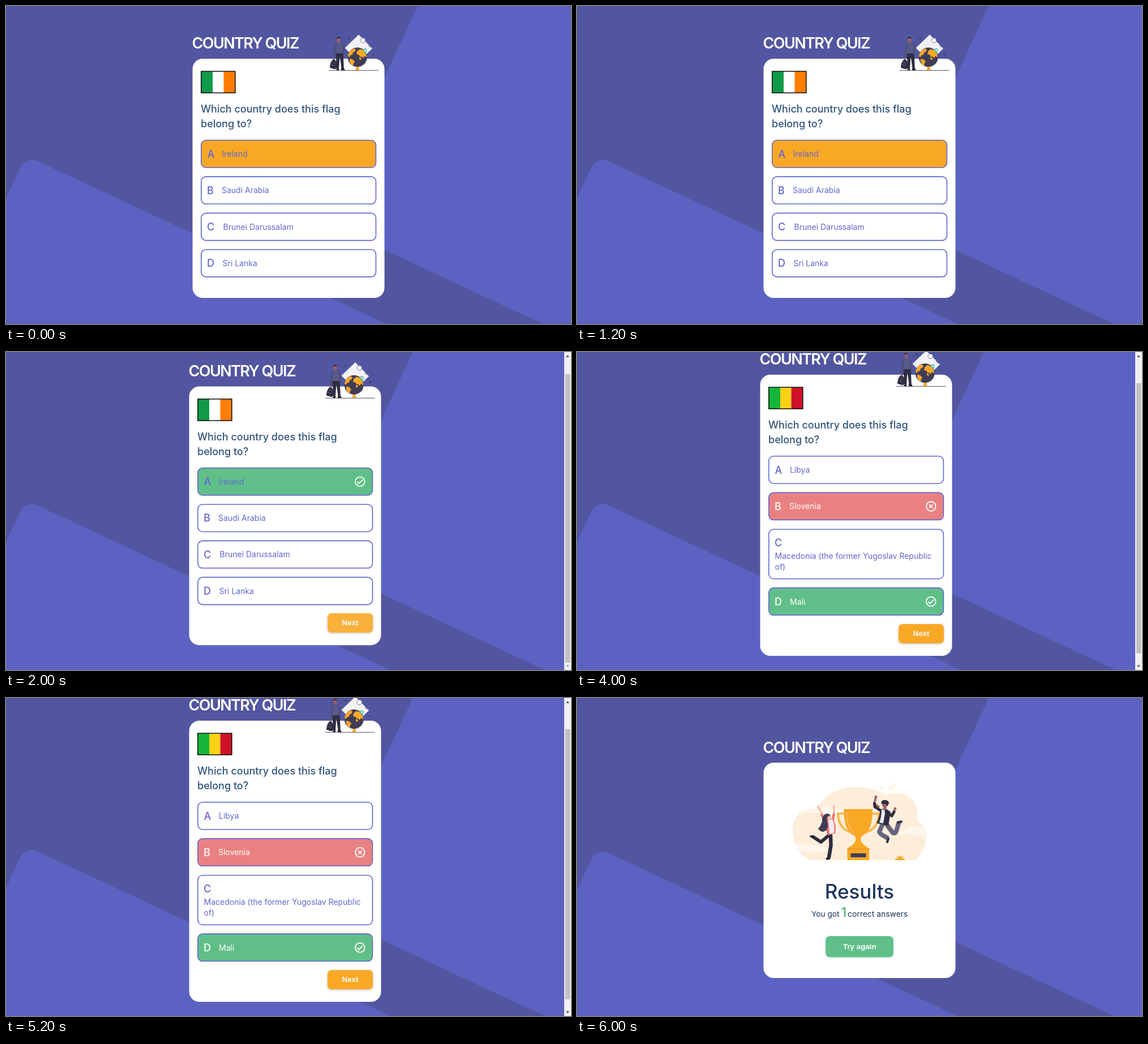
An HTML page for the animation above (8000 ms loop, 998 px wide and 561 px high).

```html
<!DOCTYPE html>
<html lang="en">
<head>
<meta charset="utf-8">
<title>Country quiz</title>
<style>
html, body { margin: 0; width: 100%; height: 100%; overflow: hidden; background: #5256a0; }
svg { display: block; width: 100vw; height: 100vh; font-family: Inter, sans-serif; }

.scene { visibility: hidden; animation: show 8s step-end infinite; }
.s1 { animation-delay: -8s; }
.s2 { animation-delay: -6s; }
.s3 { animation-delay: -4s; }
.s4 { animation-delay: -2s; }
@keyframes show {
  0% { visibility: visible; }
  25%, 100% { visibility: hidden; }
}

.title { font-size: 27px; font-weight: 600; letter-spacing: -1.6px; fill: #fff; }
.ask { font-size: 18px; font-weight: 500; fill: #2f527b; }
.key { font-size: 18px; font-weight: 500; }
.opt { font-size: 14px; }
.rows { fill: #6066d0; }
.rows .on { fill: #fff; }
.box { stroke: #6066d0; stroke-width: 1.6; }
.btn { font: bold 13.33px "Liberation Sans", Arial, sans-serif; fill: #fff; text-anchor: middle; }
.next { filter: drop-shadow(0 1.5px 2px rgba(0, 0, 0, .25)); }
.res { fill: #1d355d; }
.limb { fill: none; stroke-linecap: round; stroke-linejoin: round; }
</style>
</head>
<body>
<svg viewBox="0 0 998 561" preserveAspectRatio="none">
  <defs>
    <g id="bg">
      <rect width="1100" height="700" fill="#5256a0"/>
      <g fill="#5c62c2">
        <rect x="35" y="264" width="1300" height="1000" rx="23" transform="rotate(25 35 264)"/>
        <rect x="552" y="-724" width="1100" height="1100" rx="23" transform="rotate(25 552 376)"/>
      </g>
    </g>

    <rect id="box" class="box" x="344.8" y="236.8" width="308.6" height="48.2" rx="8.5"/>

    <g id="ring" fill="none" stroke="#fff" stroke-width="2"><circle cx="12" cy="12" r="9"/></g>
    <g id="yes" transform="scale(.92) translate(-12 -12)">
      <use href="#ring"/>
      <path fill="#fff" d="M16.59 7.58 10 14.17l-2.59-2.58L6 13l4 4 8-8z"/>
    </g>
    <g id="no" transform="scale(.92) translate(-12 -12)">
      <use href="#ring"/>
      <path fill="#fff" d="M14.59 8 12 10.59 9.41 8 8 9.41 10.59 12 8 14.59 9.41 16 12 13.41 14.59 16 16 14.59 13.41 12 16 9.41z"/>
    </g>

    <g id="bar">
      <rect x="986" width="12" height="561" fill="#f1f1f1"/>
      <path d="M989 9h6l-3-3.4z" fill="#505050"/>
    </g>

    <!-- traveller with globe -->
    <g id="travel">
      <path d="M623 50.5 647 75 623 98 598.5 74z" fill="#f2f2f5"/>
      <circle cx="630.3" cy="60.5" r="4.3" fill="#fff" stroke="#5d6096" stroke-width=".9"/>
      <path d="M640 69l4 4" stroke="#3f3d56" stroke-width="1"/>
      <circle cx="606" cy="57.5" r="1.7" fill="#3f3d56"/>
      <circle cx="649" cy="85.5" r="1.5" fill="#3f3d56"/>
      <path d="M604 98a18.8 18.8 0 0 0 33-1" fill="none" stroke="#d8d8e0" stroke-width="1.2"/>
      <path d="M618.5 107h5l.5 6h-6z" fill="#f9a826"/>
      <circle cx="620.7" cy="90.2" r="17" fill="#3f3d56"/>
      <g fill="#f9a826">
        <path d="M605 84q3-7 10-9l3 2-2 4-3 1-1 4-4 1-1 3-3-1z"/>
        <path d="M607 93l5 1 4 4-2 3-1 4-3-1-3-6z"/>
        <path d="M620 80l5-4 7 2 4 6 1 7-4-3-2 4-3-3-2 1-3-4-4-1z"/>
        <path d="M624 90l4 2-1 3-3-1z"/>
      </g>
      <circle cx="634.5" cy="78" r="2.4" fill="#fff" stroke="#3bb5a0" stroke-width="1.5"/>
      <path d="M633 80.5h3l-1.5 4z" fill="#3bb5a0"/>
      <path d="M570 113.6h87.5" stroke="#3f3d56" stroke-width=".9"/>
      <path d="M585.6 59h4.6v7h-4.6z" fill="#a0616a"/>
      <ellipse cx="587.5" cy="59.3" rx="3" ry="3.8" fill="#a0616a"/>
      <path d="M583.8 59q-.5-4.5 3.5-4.5 4-.2 3.6 4.3l-1-1.8h-4.2z" fill="#2f2e41"/>
      <path d="M582.5 81h13l1.3 29h-4.3l-3-22-1.5 22h-4.2z" fill="#2f2e41"/>
      <path d="M583 113.2q1.5-3.8 5-3.7l.2 3.7zM592 109.5h4.5l2.5 3.7h-7z" fill="#23222f"/>
      <path d="M585 64.3l5.5-.2 4.5 2.4 1 17h-14l-.8-16z" fill="#575a89"/>
      <path class="limb" d="M583 67.5l-2 10-.8 13.5M594.3 68l2.3 7.5-1.8 7" stroke="#4d507b" stroke-width="3.2"/>
      <circle cx="579.8" cy="93" r="1.6" fill="#a0616a"/>
      <path d="M576 96q2-3.5 5-1l3.5 5 1 10-5 1.5-8.5-2.5q0-8 4-13z" fill="#2f2e41"/>
      <path d="M573.5 103l8 2.5M576 99l6 2" stroke="#6c6a90" stroke-width=".9"/>
    </g>

    <!-- celebration -->
    <g id="party">
      <path d="M410 286C392 276 380 253 381 231c0-21 15-36 41-36 16-25 42-38 70-38 22 0 41 6 55 14 25-8 50 2 54 25 1 8 0 14 1 21 9 4 15 13 15 26 0 18-8 34-20 43z" fill="#fdeedb"/>
      <g fill="#fff6eb">
        <path d="M422 196q12 0 20-6 30 8 62 8-40 15-78 5-20-2-39 2 12-10 35-9z"/>
        <path d="M548 242q10-10 25-6 18-14 43-8l1 17q-38-8-69-3z"/>
        <path d="M386 255q16-1 25 6 19-4 34 7-30 10-55 0z"/>
        <path d="M548 161q4-11 15-11 1 10-9 15zM535 161q2-7 8-8 0 7-5 9z"/>
      </g>

      <g fill="none" stroke="#f9b53f" stroke-width="3.6">
        <path d="M474 204h-13q1 29 27 34M520 204h13q-1 29-27 34"/>
      </g>
      <path d="M471.5 196h50.5q1 38-18 47-3 2-3 6 1 9 15 16v21h-38.5v-21q14-7 15-16 0-4-3-6-19-9-18-47z" fill="#f9a826"/>
      <path d="M477 266.3h40" stroke="#dc9018" stroke-width="1"/>
      <path d="M476 201q0 27 14 38" fill="none" stroke="#fbbd5a" stroke-width="2"/>
      <rect x="483.5" y="274" width="27" height="7" fill="#3f3d56"/>
      <path d="M561 286q2-5 7-3l-4-4 5 1 1.5-3 1.5 3 5-1-4 4q5-1 7 3z" fill="#f9a826"/>

      <g class="limb">
        <path d="M438 214l-6-11-6.5-12" stroke="#f3b7a8" stroke-width="3"/>
        <path d="M452 213l2-12v-11" stroke="#f3b7a8" stroke-width="3"/>
        <path d="M437 215l-5-9M452 215l1.5-10" stroke="#f56f6b" stroke-width="4"/>
        <path d="M445 242l-14 12-14-9" stroke="#2f2e41" stroke-width="6"/>
        <path d="M448 243l.5 17-3.5 21" stroke="#2f2e41" stroke-width="6.5"/>
        <path d="M417 245l-4-1M445 283.5h-4" stroke="#23222f" stroke-width="3.5"/>
      </g>
      <path d="M438 214l14-1q7 10 4 26l-13 3q-5-11-5-28z" fill="#f56f6b"/>
      <path d="M444 215l7-1q5 10 3 24l-8 2z" fill="#f1eff5"/>
      <path d="M446 221l7 9" stroke="#d7d4e2" stroke-width="1"/>
      <circle cx="443.5" cy="210" r="4.6" fill="#f3b7a8"/>
      <path d="M448 207q-4-5-10-2-6 4-5 13-2 7-7 13 4 5 9 5 9-2 8-14-3-7 0-13z" fill="#3f3d56"/>

      <g class="limb">
        <path d="M533 192l-8-6 3-11M555 207l4-5 3-7" stroke="#a0616a" stroke-width="3.5"/>
        <path d="M537 199l-11-7-.5-6M549 203l7 5 4-7" stroke="#2f2e41" stroke-width="5"/>
        <path d="M540 222l-6 14q0 4 13 10" stroke="#67647e" stroke-width="8"/>
        <path d="M546 222l12 16q4 2 6-3l4-14" stroke="#67647e" stroke-width="8"/>
        <path d="M550 248l-2 6M567 219.5l6-1.5" stroke="#2f2e41" stroke-width="4"/>
      </g>
      <circle cx="528" cy="174.5" r="2.4" fill="#a0616a"/>
      <circle cx="562" cy="195" r="2.3" fill="#a0616a"/>
      <path d="M535 197l9-3 10 7-4 24-21-4q6-12 6-24z" fill="#2f2e41"/>
      <path d="M538 197l5-1 1 8-3 17-7-1q4-11 4-23z" fill="#f1eff5"/>
      <path d="M541 190h6l-1 7-5 1z" fill="#a0616a"/>
      <circle cx="543.5" cy="188.5" r="4.7" fill="#a0616a"/>
      <path d="M538 187q-2-7 5-7 7 0 8 5-1 5-4 6l-1-4z" fill="#2f2e41"/>
    </g>

    <!-- title, picture and question shared by the quiz pages -->
    <g id="head">
      <text class="title" x="328.5" y="75.3">COUNTRY QUIZ</text>
      <use href="#travel"/>
      <g class="ask">
        <text x="344" y="188">Which country does this flag</text>
        <text x="344" y="214.3">belong to?</text>
      </g>
    </g>
    <path id="frame" d="M344.8 115.3h60v38h-60z" fill="none" stroke="#111" stroke-width="1.6"/>
    <g id="irish">
      <path d="M345 115h20v39h-20z" fill="#0f9b4a"/>
      <path d="M365 115h19.5v39H365z" fill="#fff"/>
      <path d="M384.5 115H405v39h-20.5z" fill="#ff7d00"/>
      <use href="#frame"/>
    </g>
    <g id="mali">
      <path d="M345 115h20v39h-20z" fill="#14b53a"/>
      <path d="M365 115h19.5v39H365z" fill="#fcd116"/>
      <path d="M384.5 115H405v39h-20.5z" fill="#ce1126"/>
      <use href="#frame"/>
    </g>

    <g id="rest">
      <use href="#box" y="64.3" fill="#fff"/>
      <use href="#box" y="128.6" fill="#fff"/>
      <use href="#box" y="192.9" fill="#fff"/>
      <g class="key">
        <text x="355" y="331.7">B</text>
        <text x="355" y="396">C</text>
        <text x="355" y="460.3">D</text>
      </g>
      <g class="opt">
        <text x="381" y="330.4">Saudi Arabia</text>
        <text x="383.5" y="394.7">Brunei Darussalam</text>
        <text x="382.5" y="459">Sri Lanka</text>
      </g>
    </g>
    <g id="first" class="on">
      <text class="key" x="355.5" y="267.5">A</text>
      <text class="opt" x="381.5" y="266">Ireland</text>
    </g>
  </defs>

  <g class="scene s1">
    <use href="#bg"/>
    <rect x="329.5" y="93" width="339" height="422" rx="18" fill="#fff"/>
    <use href="#head"/>
    <use href="#irish"/>
    <g class="rows">
      <use href="#box" fill="#f9a826"/>
      <use href="#first"/>
      <use href="#rest"/>
    </g>
  </g>

  <g class="scene s2">
    <use href="#bg" transform="scale(.988)"/>
    <g transform="translate(-6 -32.3)">
      <rect x="329.5" y="93" width="339" height="456.5" rx="18" fill="#fff"/>
      <use href="#head"/>
      <use href="#irish"/>
      <g class="rows">
        <use href="#box" fill="#60bf88"/>
        <use href="#first"/>
        <use href="#yes" x="631.3" y="261" transform="translate(631.3 261) translate(-631.3 -261)"/>
        <use href="#rest"/>
      </g>
      <rect class="next" x="574" y="493.3" width="80" height="34" rx="7" fill="#fab13c"/>
      <text class="btn" x="614" y="514.6">Next</text>
    </g>
    <use href="#bar"/>
    <rect x="988" y="39" width="8.5" height="509" fill="#c1c1c1"/>
    <path d="M989 552.6h6l-3 3.4z" fill="#a3a3a3"/>
  </g>

  <g class="scene s3">
    <use href="#bg" transform="scale(.988)"/>
    <g transform="translate(-6 -53)">
      <rect x="329.5" y="93" width="339" height="496" rx="18" fill="#fff"/>
      <use href="#head"/>
      <use href="#mali"/>
      <g class="rows">
        <use href="#box" fill="#fff"/>
        <use href="#box" y="64.3" fill="#ea8181"/>
        <rect class="box" x="344.8" y="365.8" width="308.6" height="87.4" rx="8.5" fill="#fff"/>
        <use href="#box" y="232.3" fill="#60bf88"/>
        <text class="key" x="355.5" y="267.5">A</text>
        <text class="opt" x="382" y="266.3">Libya</text>
        <g class="on">
          <text class="key" x="355" y="331.7">B</text>
          <text class="opt" x="381" y="330.4">Slovenia</text>
          <text class="key" x="355" y="499.8">D</text>
          <text class="opt" x="382" y="498.5">Mali</text>
        </g>
        <text class="key" x="355" y="396">C</text>
        <text class="opt" x="355.5" y="417.5">Macedonia (the former Yugoslav Republic</text>
        <text class="opt" x="355.5" y="437">of)</text>
        <use href="#no" x="631.3" y="325.3"/>
        <use href="#yes" x="631.3" y="493.3"/>
      </g>
      <rect class="next" x="574" y="533" width="80" height="34" rx="7" fill="#f9a826"/>
      <text class="btn" x="614" y="554.4">Next</text>
    </g>
    <use href="#bar"/>
    <rect x="988" y="55" width="8.5" height="476.5" fill="#c1c1c1"/>
    <path d="M989 552.6h6l-3 3.4z" fill="#505050"/>
  </g>

  <g class="scene s4">
    <use href="#bg"/>
    <text class="title" x="328.5" y="96.7">COUNTRY QUIZ</text>
    <rect x="329.5" y="114" width="339" height="380" rx="18" fill="#fff"/>
    <use href="#party"/>
    <g class="res">
      <text x="499" y="354" font-size="35" font-weight="500" text-anchor="middle">Results</text>
      <text x="414" y="385.7" font-size="13.7">You got</text>
      <text x="466.5" y="386" font-size="23" font-weight="600" fill="#60bf88">1</text>
      <text x="478" y="385.7" font-size="13.9">correct answers</text>
    </g>
    <rect x="439" y="420" width="120" height="37.5" rx="8" fill="#60bf88"/>
    <text class="btn" x="499.3" y="443">Try again</text>
  </g>
</svg>
</body>
</html>
```
